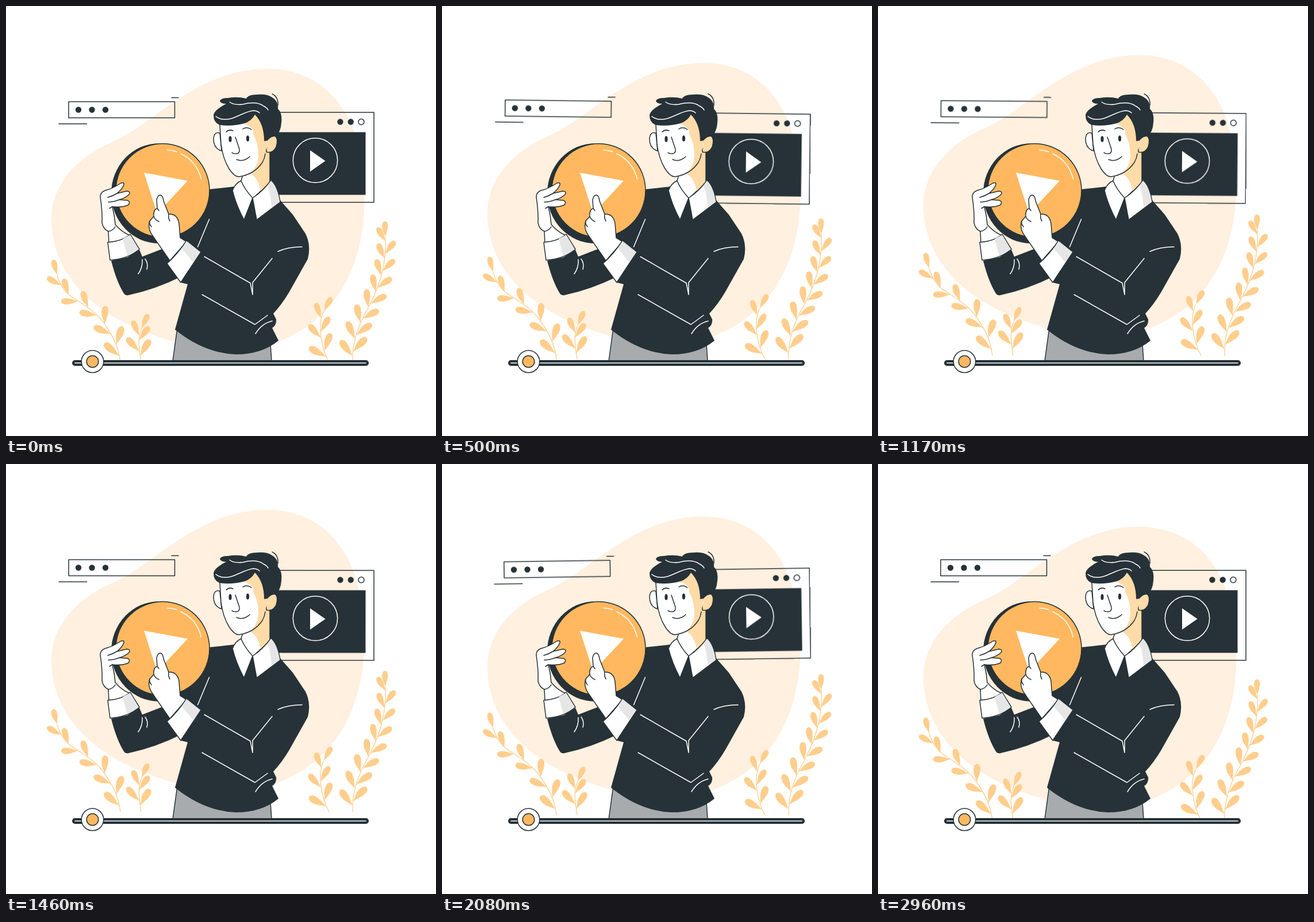
An HTML page that plays this animation: 748 px wide and 748 px high, repeating every 3 s.

```html
<!DOCTYPE html>
<html lang="en">
<head>
<meta charset="utf-8">
<title>Video player</title>
<style>
  html, body { margin: 0; width: 100%; height: 100%; overflow: hidden; background: #fff; }
  svg { display: block; width: 100vw; height: 100vh; }

  .dark { fill: #263238; }
  .orange { fill: #ffb85f; }
  .skin { fill: #ffdba8; }
  .white { fill: #fff; }
  .shade { fill: #e6e6e6; }
  .line { stroke: #263238; stroke-width: 1.5; stroke-linecap: round; stroke-linejoin: round; }
  .bare { fill: none; }
  .crease { fill: none; stroke: #fff; stroke-width: 1.5; stroke-linecap: round; stroke-linejoin: round; }
  .dots { stroke: #263238; stroke-width: 10.4; stroke-linecap: round; }
  .leaf { fill: #ffce8d; }
  .stem { fill: none; stroke: #ffce8d; stroke-width: 1.3; }

  .blob, #plants { animation: rise 3s linear infinite; }
  .blob { --lift: -30px; fill: #fff0df; }
  #plants { --lift: -15px; }
  .panels { transform-origin: 366px 250px; animation: sway 3s linear infinite; }

  @keyframes rise {
    0%, 98.667%, 100% { transform: translateY(0); }
    49.333% { transform: translateY(var(--lift)); }
  }
  @keyframes sway {
    0%, 98.667%, 100% { transform: rotate(0deg); }
    24.667% { transform: rotate(1deg); }
    74% { transform: rotate(-1deg); }
  }
</style>
</head>
<body>
<svg viewBox="0 0 748 748">
  <path class="blob" d="M458 109C528 111 572 148 597 199C617 240 625 300 623 355C620 420 600 490 545 540C505 578 440 600 400 602C340 602 280 582 235 564C150 530 79 465 79 370C79 310 125 265 175 241C215 224 240 204 270 182C325 143 385 108 458 109Z"/>

  <g class="panels">
    <g class="line bare">
      <rect x="109" y="166.500" width="184.500" height="28"/>
      <path d="M288 159.500H300M92 205H140.500"/>
      <rect x="425" y="185" width="215" height="156.500"/>
      <circle cx="618" cy="201.500" r="5"/>
    </g>
    <path class="dots" stroke-dasharray="0 23.500" d="M126 180.500H174"/>
    <path class="dots" stroke-dasharray="0 18.200" d="M581.500 201.500H601"/>
    <rect class="dark" x="440" y="219.500" width="185.500" height="109"/>
    <circle class="crease" cx="538" cy="268.500" r="38.700"/>
    <path class="white" d="M529 251V288L555.500 269.500Z"/>
  </g>

  <g id="plants"></g>

  <!-- trousers and sweater -->
  <path class="line" fill="#a7abae" d="M298 560L290 618H462L460 588Z"/>
  <path class="dark" d="M398 314L352 319L310 380L298 425L304 481L316 484L294 563Q345 604 400 606Q445 606 474 582L463 560Q471 555 470 545L465 535Q480 519 493 497L525 440Q531 416 521 396L499 363L477 338L440 325Z"/>
  <path class="dark" d="M183 443Q192 479 205 500Q208 504 213 503Q260 493 304 471L300 415L268 424L237 436L232 424L211 437Z"/>

  <!-- neck and collar -->
  <path class="white" d="M411 290L408 310L429 334L459 306V240H430Z"/>
  <path class="skin" d="M411 297Q432 290 446 272L452 245L459 240V306L443 322Q439 300 426 292Z"/>
  <path class="line bare" d="M411 297L408 307M459 254V305"/>
  <path class="line white" d="M409 304Q399 308 394 321Q400 346 414 372L429 334Q415 319 409 304Z"/>
  <path class="line white" d="M461 303Q473 314 477 341L436 372L429 334Q447 322 461 303Z"/>
  <path class="shade" d="M455 312L461 304Q472 314 476 341L462 350Q461 330 455 312Z"/>

  <!-- head -->
  <path class="line white" d="M372 221Q362 218 361 231Q361 248 375 252Z"/>
  <path class="line skin" d="M452 236Q462 223 469 227Q474 232 470 245Q464 257 453 254Z"/>
  <path class="white" d="M372 200L374 240Q377 265 388 283Q397 297 405 297Q432 293 446 272L455 240L448 200L433 187Z"/>
  <path class="skin" d="M414 205L433 187L448 205L455 238L450 258L446 272Q438 286 424 292Q438 280 439 260Q439 238 430 223Q432 210 414 205Z"/>
  <path class="line bare" d="M372 206L374 240Q377 265 388 283Q397 297 405 297Q432 293 446 272Q450 265 451 257"/>
  <path class="dark" d="M372 207Q361 203 361 190Q362 181 383 170Q373 170 372 165Q374 160 386 160Q403 157 418 161Q421 154 438 154Q455 153 463 159Q474 165 473 179Q481 186 479 203Q478 219 469 227Q461 226 455 234L449 235Q449 205 433 189Q427 200 415 204Q393 210 372 207Z"/>
  <path class="line bare" d="M463 153Q474 158 473 173"/>
  <path class="crease" d="M365 192Q375 200 391 196C405 192 418 183 430 182Q437 182 441 186M389 167Q397 173 412 171C428 167 440 168 448 174Q454 177 456 181"/>
  <g class="dark">
    <ellipse cx="390" cy="231.500" rx="2.600" ry="5.200"/>
    <ellipse cx="420.500" cy="230.500" rx="2.600" ry="5.200"/>
  </g>
  <path class="line bare" d="M383 219Q388 214 395 217M412 214Q419 209 427 215M399 228L406 249Q407 257 400 257Q395 257 393 255M401 267Q413 272 424 262"/>

  <!-- disc -->
  <ellipse class="dark" cx="266" cy="326" rx="83" ry="87"/>
  <circle class="orange line" cx="272.500" cy="321" r="81.500"/>
  <path class="white" d="M240 290L316 304L263 361Z"/>
  <path class="crease" d="M281 250.500Q290 251 297 253.500M304 257Q332 270 339.500 301"/>

  <!-- hand holding the disc -->
  <path class="line white" d="M179 412L178 392Q169 388 167 377Q168 360 164 332Q164 324 172 321Q185 318 200 308Q206 306 205 311Q202 319 193 326L210 322Q217 322 214 328Q208 334 197 337L211 338Q217 340 213 346Q202 351 185 349Q189 365 190 380Q201 393 215 399L205 415Z"/>
  <path class="line bare" d="M193 326Q185 331 177 333M197 337Q187 341 178 341M185 349L180 352M178 392Q186 391 190 384"/>
  <path class="line white" d="M177 411Q203 409 216 397L232 423Q212 440 181 442Z"/>
  <path class="shade" d="M203 405L216 398L231 423L211 435Z"/>
  <path class="crease" d="M237 441Q238 455 230 466M242 440Q248 448 245 458"/>

  <!-- pointing hand -->
  <path class="line white" d="M285 443L254 398Q246 386 250 374L257 366Q256 354 263 352L262 337Q264 328 269 329Q273 330 274 339L283 362Q298 361 301 378L303 403L314 410Z"/>
  <path class="line bare" d="M257 366Q260 373 266 375M250 374Q249 380 253 384M283 362Q282 369 285 374M263 352L266 356"/>
  <path class="line white" d="M314 408L339 428L304 481L280 448Q299 431 314 408Z"/>
  <path class="shade" d="M314 409L338 428L326 446L306 422Z"/>

  <path class="crease" d="M353.500 371L333.500 419M345 436L425 482L429 502V481L463 439M341 502L433 554L455 538M434 570Q445 552 463 548M473 427Q490 419 515 419"/>

  <!-- progress bar -->
  <rect class="dark" x="115" y="616" width="516" height="10" rx="5"/>
  <path class="crease" d="M120 621H626"/>
  <circle class="line white" cx="150.500" cy="618.500" r="19.300"/>
  <circle class="line orange" cx="150.500" cy="618.500" r="10.300"/>
</svg>
<script>
  const root = document.getElementById('plants');
  const LEAF = 'M0 0C-2-8-6-13-5.5-21C-5-28-2-30 0-30C3-30 6-27 5.5-21C5-13 2-8 0 0Z';

  function addPath(cls, d) {
    const path = document.createElementNS('http://www.w3.org/2000/svg', 'path');
    path.setAttribute('class', cls);
    path.setAttribute('d', d);
    root.append(path);
    return path;
  }

  // Leaves alternate sides up the stem, two per step; skew spaces them within it.
  function plant(d, { count, side, step, skew }) {
    const stem = addPath('stem', d);
    const length = stem.getTotalLength();

    function grow(dist, turn) {
      const p = stem.getPointAtLength(dist);
      const q = stem.getPointAtLength(dist - 2);
      const angle = Math.atan2(p.x - q.x, q.y - p.y) * 180 / Math.PI + turn;
      const size = 1.16 - .24 * dist / length;
      addPath('leaf', LEAF).setAttribute('transform',
        `translate(${p.x} ${p.y}) rotate(${angle}) scale(${size})`);
    }

    for (let i = 0; i < count; i++) {
      const second = i % 2;
      const dist = 11 + step * (Math.floor(i / 2) + second * skew);
      grow(dist, (second ? -side : side) * (40 - 10 * dist / length));
    }
    grow(length, 0);
  }

  plant('M199 620C196 590 182 567 166 546C145 521 118 512 105 498Q93 484 89 468',
    { count: 9, side: -1, step: 41, skew: .5 });
  plant('M235 620C232 600 228 578 236 561',
    { count: 4, side: 1, step: 27, skew: .3 });
  plant('M562 620C548 595 541 552 553 531',
    { count: 5, side: -1, step: 34, skew: .3 });
  plant('M603 620C601 585 614 553 631 523C650 487 662 450 660 402',
    { count: 15, side: -1, step: 30, skew: .25 });
</script>
</body>
</html>
```
